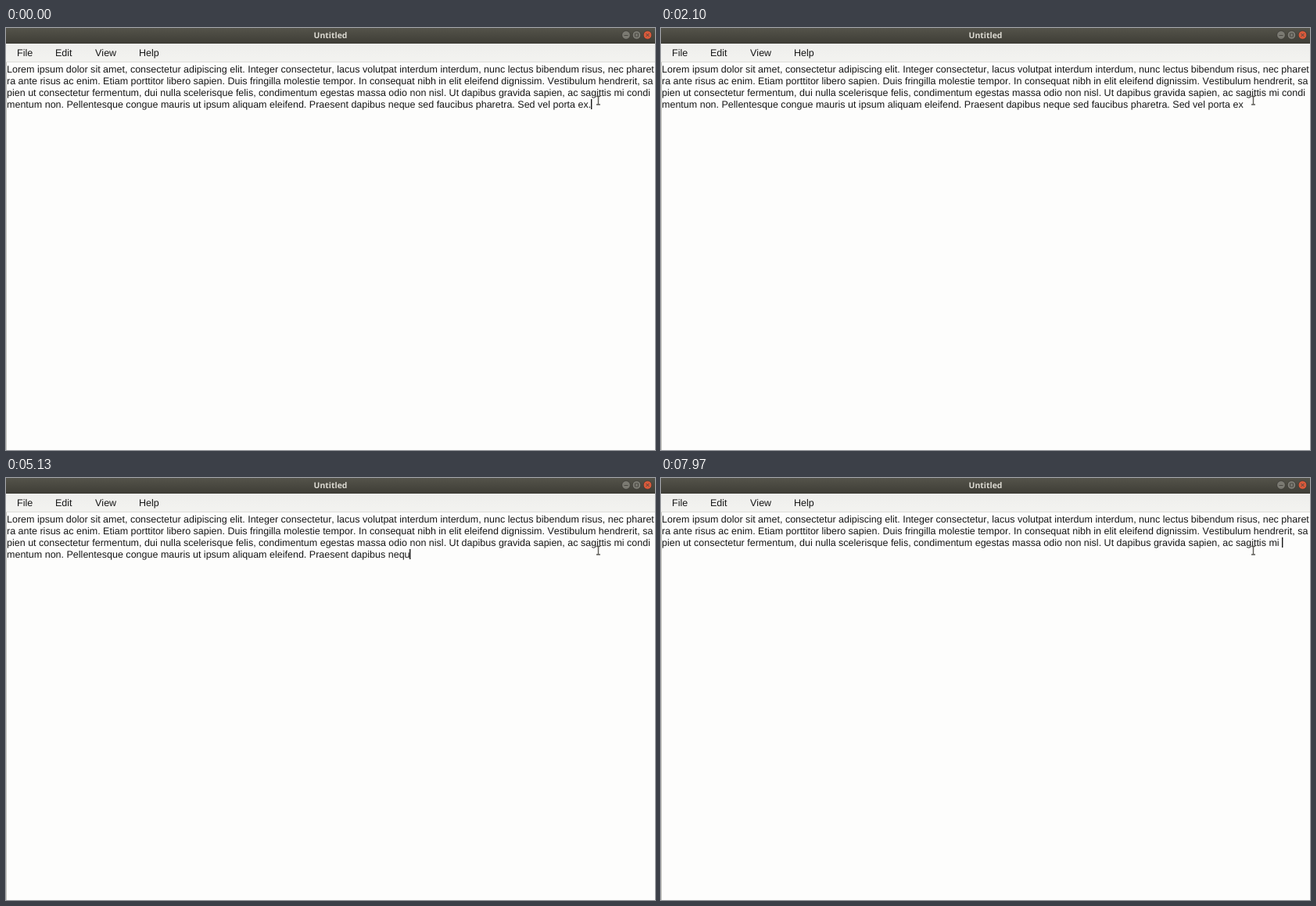
An HTML page with a canvas for the animation above (8 s loop, 830 px wide and 540 px high).

```html
<!DOCTYPE html>
<html lang="en">
<head>
<meta charset="utf-8">
<title>Untitled</title>
<style>
  html, body { margin: 0; width: 100%; height: 100%; overflow: hidden; background: #fdfdfc; }
  canvas { display: block; }
</style>
</head>
<body>
<canvas id="stage" width="830" height="540"></canvas>
<script>
const ctx = document.getElementById('stage').getContext('2d');
const LOOP = 8000;
const FONT = '12.52px "Liberation Sans", Arial, sans-serif';
const INK = '#171717';
const LINES = [
  'Lorem ipsum dolor sit amet, consectetur adipiscing elit. Integer consectetur, lacus volutpat interdum interdum, nunc lectus bibendum risus, nec pharet',
  'ra ante risus ac enim. Etiam porttitor libero sapien. Duis fringilla molestie tempor. In consequat nibh in elit eleifend dignissim. Vestibulum hendrerit, sa',
  'pien ut consectetur fermentum, dui nulla scelerisque felis, condimentum egestas massa odio non nisl. Ut dapibus gravida sapien, ac sagittis mi condi',
  'mentum non. Pellentesque congue mauris ut ipsum aliquam eleifend. Praesent dapibus neque sed faucibus pharetra. Sed vel porta ex.'
];
const TOTAL = LINES.join('').length;

// Single backspace presses, then the held key repeats.
const PRESSES = [1570, 2600, 2970, 3330, 3730];
const REPEAT_START = 4000, REPEAT_STEP = 30.9;
const BLINK = 500;

function typing(t) {
  const done = PRESSES.filter(p => p <= t);
  let deleted = done.length;
  let lastKey = deleted ? done[deleted - 1] : 0;
  if (t >= REPEAT_START) {
    const n = Math.floor((t - REPEAT_START) / REPEAT_STEP);
    deleted += n + 1;
    lastKey = REPEAT_START + n * REPEAT_STEP;
  }
  return { left: TOTAL - deleted, caret: (t - lastKey) % (2 * BLINK) < BLINK };
}

function rect(x, y, w, h, fill) {
  ctx.fillStyle = fill;
  ctx.fillRect(x, y, w, h);
}

function text(str, x, y, fill = INK, font = FONT, align = 'left') {
  ctx.font = font;
  ctx.textAlign = align;
  ctx.fillStyle = fill;
  ctx.fillText(str, x, y);
}

function shade(y, h, top, bottom) {
  const g = ctx.createLinearGradient(0, y, 0, y + h);
  g.addColorStop(0, top);
  g.addColorStop(1, bottom);
  rect(0, y, 830, h, g);
}

function stroke(points, color, width = 1) {
  ctx.strokeStyle = color;
  ctx.lineWidth = width;
  ctx.beginPath();
  for (const [x1, y1, x2, y2] of points) {
    ctx.moveTo(x1, y1);
    ctx.lineTo(x2, y2);
  }
  ctx.stroke();
}

function button(x, fill, glyph) {
  ctx.beginPath();
  ctx.arc(x, 9, 5.4, 0, Math.PI * 2);
  ctx.fillStyle = fill;
  ctx.fill();
  ctx.strokeStyle = '#3a3934';
  ctx.lineWidth = 0.8;
  ctx.stroke();
  stroke(glyph.map(([a, b, c, d]) => [x + a, 9 + b, x + c, 9 + d]), '#4a4842');
}

function drawWindow() {
  rect(0, 0, 830, 540, '#fdfdfc');
  shade(0, 20, '#54534a', '#3e3d36');
  text('Untitled', 415, 13, '#dcdad2', '600 10.4px "Noto Sans", sans-serif', 'center');
  button(793, '#7b7a72', [[-2.5, 0.5, 2.5, 0.5]]);
  button(806.5, '#7b7a72', [[-2, -2, 2, -2], [2, -2, 2, 2], [2, 2, -2, 2], [-2, 2, -2, -2]]);
  button(820.5, '#db5a3a', [[-2, -2, 2, 2], [-2, 2, 2, -2]]);

  shade(20, 23, '#eeeeec', '#f3f3f0');
  rect(0, 43, 830, 1, '#dededa');
  rect(0, 44, 1, 496, '#c4c4be');
  text('File', 14, 36);
  text('Edit', 63, 36);
  text('View', 114, 36);
  text('Help', 170, 36);
}

function drawText({ left, caret }) {
  let x = 1, y = 57;
  LINES.forEach((line, i) => {
    if (left <= 0) return;
    const part = line.slice(0, left);
    left -= part.length;
    y = 57 + 15 * i;
    text(part, 1, y);
    x = 1 + ctx.measureText(part).width;
  });
  if (caret) rect(Math.floor(x), y - 11, 1.4, 13, INK);
}

function drawPointer() {
  stroke([[757.5, 88, 757.5, 98], [755, 87.5, 760, 87.5], [755, 98, 760, 98]], '#5c5b55', 1.4);
}

function frame() {
  ctx.textRendering = 'geometricPrecision';
  ctx.fontKerning = 'none';
  drawWindow();
  drawText(typing((performance.now() - start) % LOOP));
  drawPointer();
  requestAnimationFrame(frame);
}

const start = performance.now();
frame();
</script>
</body>
</html>
```
